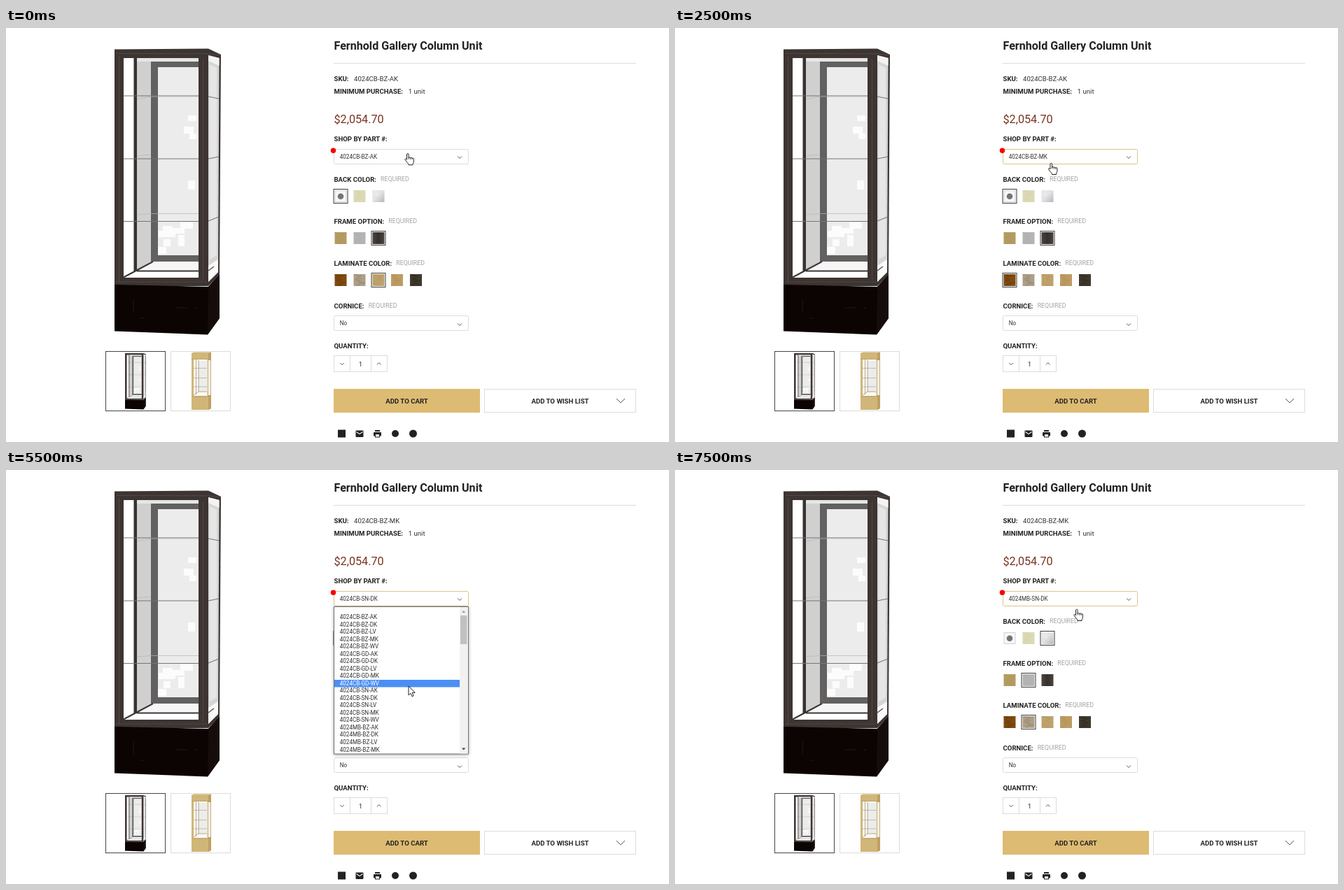
Animation, 947 px wide and 592 px high, one loop 8 s. Source, as an HTML page:

```html
<!DOCTYPE html>
<html lang="en">
<head>
<meta charset="utf-8">
<title>Product options</title>
<style>
html, body { margin: 0; width: 100%; height: 100%; overflow: hidden; background: #fff; }
svg { display: block; width: 947px; height: 592px; }
text { font: 9.6px Roboto, Arial, sans-serif; fill: #333; white-space: pre; }
.title { font-size: 16.1px; font-weight: 700; fill: #222; }
.price { font-size: 16.2px; fill: #7b3320; }
.label { font-weight: 700; fill: #222; }
.req { font-size: 8.8px; fill: #a3a3a3; }
.opt { font-size: 8.13px; }
.mid { text-anchor: middle; }
.box { fill: #fff; stroke: #dcdcdc; }
.chev { fill: none; stroke: #555; stroke-width: 1; }
#list { filter: drop-shadow(0 1.5px 2px rgba(0,0,0,.35)); }
</style>
</head>
<body>
<svg viewBox="0 0 947 592">
  <defs>
    <linearGradient id="mirror" x2="1" y2="1">
      <stop offset="0" stop-color="#d9dadc"/><stop offset=".45" stop-color="#e3e4e6"/><stop offset="1" stop-color="#b5b6b9"/>
    </linearGradient>
    <linearGradient id="bronze" x2="1">
      <stop offset="0" stop-color="#4a433c"/><stop offset=".5" stop-color="#35302c"/><stop offset="1" stop-color="#4b423c"/>
    </linearGradient>
    <clipPath id="rows"><rect x="469" y="196" width="179" height="209"/></clipPath>
  </defs>
  <g id="page"></g>
  <g id="choice"></g>
  <g id="list"></g>
  <g id="pointer"></g>
</svg>
<script>
const $ = id => document.getElementById(id);
const rect = (x, y, w, h, fill, extra = '') =>
  `<rect x="${x}" y="${y}" width="${w}" height="${h}" fill="${fill}" ${extra}/>`;
const text = (x, y, s, cls = '') => `<text x="${x}" y="${y}" class="${cls}">${s}</text>`;
const path = (d, fill, extra = '') => `<path d="${d}" fill="${fill}" ${extra}/>`;
const line = (d, color, w = 1) => path(d, 'none', `stroke="${color}" stroke-width="${w}"`);
const chevron = (x, y, r, up) =>
  `<path class="chev" d="M${x - r} ${y + (up ? r : -r) / 2}L${x} ${y + (up ? -r : r) / 2}L${x + r} ${y + (up ? r : -r) / 2}"/>`;
const box = (x, y, w, h, r = 0, style = '') =>
  `<rect class="box" x="${x}" y="${y}" width="${w}" height="${h}" rx="${r}" style="${style}"/>`;

function random(seed) {
  return () => (seed = (seed * 16807) % 2147483647) / 2147483647;
}

// Glass cabinet on a dark plinth
function cabinet() {
  const frame = '#3d3532';
  let s = path('M155 30.5L289 29.5 307 38 305 354 289 369H155Z', frame);
  s += path('M168 43H275V357H168Z', '#fff');
  s += path('M187 43H207V334L187 347Z', '#d0d0d0');
  s += path('M207 48H275V334H207Z', '#626160');
  s += path('M217 56H275V325H217Z', '#ececec');
  s += path('M187 43H275V48H187Z', '#e6e6e6');
  s += path('M182.5 43H187V348H182.5Z', '#38322f');
  s += path('M207 334H275V346H187Z', '#f6f6f6');
  s += line('M168 356.5L210 334M187 347.5H275', '#3b3634', 2);
  s += path('M170 357L187 349H275V357Z', '#fff');
  s += path('M289 39L304.5 43 303 349 289 363Z', '#d6d6d6');
  s += path('M289 39L304.5 43V54L289 47Z', '#f3f3f3');
  s += path('M291 52L301 57V325L291 331Z', '#e6e6e6');
  s += path('M289 340L303 331V349L289 363Z', '#fafafa');
  s += line('M289 347L297 341', '#5a5552', 1.5);
  s += line('M158 36.5L288 36.8 306 39M161.5 40V364M281.5 45V360', '#5a504b', .8);
  s += line('M157 363H287', '#544a46', .8);
  // Bright reflections on the back panel
  const flecks = [[260, 125, 12, 8], [254, 141, 14, 10], [262, 151, 10, 8], [260, 218, 10, 13],
    [249, 278, 18, 9], [224, 283, 14, 8], [218, 290, 24, 9], [236, 286, 19, 8],
    [225, 302, 10, 10], [217, 313, 12, 10], [246, 296, 9, 16]];
  for (const f of flecks) s += rect(...f, '#fcfcfc');
  s += line('M168 97H275M289 98L304 101M168 187H275M289 187L304 184M168 276.5H275M289 276L304 270', '#777', 1.1);
  s += line('M187 102L207 98H275M187 183L207 181M187 267L207 265.5H275', '#b5b5b5', .7);
  s += path('M155 367L289 370 305 353V415L288 438.5 155 433.5Z', '#0b0403');
  s += path('M289 370L305 353V415L288 438.5Z', '#160c09');
  s += line('M182 388V406M192 415H197M242 400H259M269 400H273', '#2c1d17', .8);
  return s;
}

function oakThumb() {
  const oak = '#d0b678';
  let s = path('M265 465L268 463.5H293V544L289 546H265Z', oak);
  s += path('M289 465L293 463.5V544L289 546Z', '#bea064');
  s += rect(268, 474, 19.5, 52, '#faf9f6') + rect(289, 475, 3.2, 50, '#f1eee6');
  s += rect(275, 476, 12.5, 44, '#ececeb');
  s += line('M271.5 474V524M268 525L275 520H287M275 475V520', '#a99367', .8);
  s += line('M268 486.5H287M268 500.5H287M268 513H287', '#999', .6);
  s += line('M265 473.5H293M265 527H289L293 525', '#b59a62', .7);
  return s;
}

const COLS = [469.5, 496.5, 523.5, 550, 577];
const ROWS = [232, 292, 352];
let seed = 7;

function swatch(col, row, fill, grain) {
  const x = COLS[col], y = ROWS[row], rnd = random(seed += 31);
  let s = rect(x, y, 17, 17, fill);
  for (let i = 0; grain && i < 9; i++) {
    const gx = x + rnd() * 8, gy = y + 1 + i * 1.8;
    s += line(`M${gx} ${gy}l${4 + rnd() * 5} ${rnd() - .5}`, grain, .7);
  }
  return s;
}

function swatches() {
  const x = COLS[0], y = ROWS[0];
  return rect(x + .5, y + .5, 16, 16, '#f7f7f7', 'stroke="#d2d2d2"')
    + `<circle cx="${x + 8.5}" cy="${y + 8.7}" r="4.3" fill="#747474"/>`
    + swatch(1, 0, '#dcdab5', '#d3d1aa') + swatch(2, 0, 'url(#mirror)')
    + path('M523.5 232H532V240H523.5Z', '#eeeeef', 'opacity=".6"')
    + swatch(0, 1, '#b49c61', '#af965a') + swatch(1, 1, '#b4b4b5', '#afafb0') + swatch(2, 1, 'url(#bronze)')
    + swatch(0, 2, '#7f4b10', '#633608') + swatch(1, 2, '#ae9f87', '#8f806b')
    + swatch(2, 2, '#bfa26d', '#b1935d') + swatch(3, 2, '#bd9c63', '#b18e54')
    + swatch(4, 2, '#40382c', '#2c261d');
}

function icons() {
  const ink = '#222';
  return rect(474, 574.5, 11, 11, ink)
    + rect(499.5, 575.5, 11, 9.5, ink, 'rx="1"') + line('M500.5 577.5L505 580.7 509.5 577.5', '#fff', 1.1)
    + rect(527, 575, 7, 2, ink) + rect(525, 578, 11, 5.5, ink, 'rx="1"')
    + rect(527.5, 580.7, 6, 4.3, '#fff', `stroke="${ink}"`)
    + `<circle cx="556" cy="580" r="5" fill="${ink}"/><circle cx="581.5" cy="580" r="5.5" fill="${ink}"/>`;
}

function page() {
  const labels = [['BACK COLOR:', 220, 535], ['FRAME OPTION:', 280, 546.3],
    ['LAMINATE COLOR:', 340, 557.3], ['CORNICE:', 400.7, 517.7]];
  return `<g id="case">${cabinet()}</g>`
    + box(142.5, 462.5, 85, 85, 0, 'stroke:#444') + box(235.5, 462.5, 85, 85)
    + '<use href="#case" transform="translate(170 465) scale(.197) translate(-155 -30)"/>' + oakThumb()
    + text(468.5, 31, 'Fernhold Gallery Column Unit', 'title')
    + line('M468 50.5H900', '#dcdcdc')
    + text(468.5, 75.5, 'SKU:', 'label')
    + text(468.5, 93.5, 'MINIMUM PURCHASE:', 'label') + text(574.7, 93.5, '1 unit')
    + text(468.5, 135.7, '$2,054.70', 'price')
    + text(468.5, 162.3, 'SHOP BY PART #:', 'label')
    + labels.map(([s, y, x]) => text(468.5, y, s, 'label') + text(x, y - .6, 'REQUIRED', 'req')).join('')
    + swatches()
    + box(468.5, 411.5, 192, 21, 2) + text(476.7, 425, 'No', 'opt') + chevron(648, 424, 3)
    + text(468.5, 457.6, 'QUANTITY:', 'label')
    + box(468.5, 468.5, 76, 23) + line('M491.5 469V491M521.5 469V491', '#dcdcdc')
    + chevron(480, 480.3, 2.7) + chevron(532.7, 480, 2.7, true) + text(506.5, 483.6, '1', 'mid')
    + rect(468, 516, 209, 34, '#debb72') + text(572.5, 536.8, 'ADD TO CART', 'label mid')
    + box(683.5, 516.5, 216, 33) + text(791.5, 536.8, 'ADD TO WISH LIST', 'label mid')
    + chevron(878, 533, 6) + icons();
}

const PARTS = ['CB', 'MB', 'PB'].flatMap(b => ['BZ', 'GD', 'SN'].flatMap(f =>
  ['AK', 'DK', 'LV', 'MK', 'WV'].map(l => `4024${b}-${f}-${l}`)));

function choice(s) {
  let out = text(497, 75.5, s.sku)
    + box(468.5, 173.5, 192, 21, 2, s.focus ? 'stroke:#d8c48c' : '')
    + text(476.7, 186.8, s.part, 'opt') + chevron(648, 185, 3);
  s.picks.forEach((col, row) =>
    out += rect(COLS[col] - 1.5, ROWS[row] - 1.5, 20, 20, 'none', 'stroke="#3a3a3a"'));
  const dots = s.marks
    ? s.picks.map((col, row) => [COLS[col] - 2.5, ROWS[row] - 2.2])
    : [[467.5, 175.3]];
  for (const [x, y] of dots) out += `<circle cx="${x}" cy="${y}" r="3.7" fill="#f80000"/>`;
  return out;
}

function list(s) {
  if (s.hover === undefined) return '';
  const scroll = s.scroll || 0, step = 10.53;
  const rows = PARTS.map((p, i) => {
    const y = 210 + i * step - scroll, on = i === s.hover;
    if (y < 190 || y > 412) return '';
    return (on ? rect(469, Math.round(y - 4.6), 179, 10.5, '#4b8ff5') : '')
      + `<text class="opt" x="476.7" y="${y + 3}"${on ? ' style="fill:#fff"' : ''}>${p}</text>`;
  }).join('');
  return rect(468.5, 195.5, 192, 210.5, '#fff', 'stroke="#727272"')
    + `<g clip-path="url(#rows)">${rows}</g>`
    + rect(648, 196, 12, 209.5, '#f1f1f1')
    + rect(649, 208 + scroll * .19, 9.5, 41, '#c1c1c1')
    + path('M651 204L653.7 201 656.4 204Z', scroll ? '#444' : '#a0a0a0')
    + path('M651 397.5L653.7 400.5 656.4 397.5Z', '#444');
}

const SHAPES = {
  arrow: 'M0 0V13L3 10.3 5 14.8 7.1 13.9 5.2 9.4H9.2Z',
  hand: 'M-1.5 1.2q0-1.4 1.3-1.4t1.3 1.4V6q.2-1 1.3-.9 1.2.1 1.3 1.2.2-.9 1.3-.8 1.1.1 1.2 1.2.2-.7 1.1-.6 1.1.1 1.1 1.5V11q0 2-1.4 3.5V16H1V14.8Q-1.5 12-3.8 8.8q-.6-1.1.2-1.6.9-.4 2.1 1.2Z'
};

function pointer([kind, x, y]) {
  const folds = kind === 'hand' ? line('M1.1 5.5V8M3.7 6V8.3M6.2 6.5V8.6', '#222', .8) : '';
  return `<g transform="translate(${x} ${y})">`
    + path(SHAPES[kind], '#fff', 'stroke="#222" stroke-width="1" stroke-linejoin="round"') + folds + '</g>';
}

// Each step carries over sku, part, picks and focus from the one before
const steps = [
  { at: 0, sku: '4024CB-BZ-AK', part: '4024CB-BZ-AK', picks: [0, 2, 2], cursor: ['hand', 574, 179.8] },
  { at: 500, focus: true, hover: 0, cursor: ['hand', 574, 179.8] },
  { at: 1000, hover: 3, cursor: ['arrow', 524, 240] },
  { at: 1500, part: '4024CB-BZ-MK', picks: [0, 2, 0], marks: true, cursor: ['arrow', 612, 354] },
  { at: 2500, cursor: ['hand', 537.5, 193.5] },
  { at: 3000, hover: 3, cursor: ['hand', 540, 185] },
  { at: 3500, hover: 11, cursor: ['arrow', 548, 323] },
  { at: 4000, part: '4024CB-SN-DK', picks: [0, 1, 1], marks: true, cursor: ['arrow', 564, 324] },
  { at: 5000, cursor: ['hand', 580, 182] },
  { at: 5500, sku: '4024CB-BZ-MK', hover: 9, cursor: ['arrow', 575, 309] },
  { at: 6000, hover: 24, scroll: 147.7, cursor: ['arrow', 570, 312] },
  { at: 6500, part: '4024MB-SN-DK', picks: [2, 1, 1], marks: true, cursor: ['arrow', 583, 383] },
  { at: 7500, cursor: ['hand', 574, 199.5] }
];
steps.forEach((s, i) => {
  if (!i) return;
  const { sku, part, picks, focus } = steps[i - 1];
  steps[i] = { sku, part, picks, focus, ...s };
});

const LOOP = 8000;
let shown;

function draw(now) {
  const t = now % LOOP;
  const s = steps.findLast(step => step.at <= t) || steps[0];
  if (s !== shown) {
    $('choice').innerHTML = choice(s);
    $('list').innerHTML = list(s);
    $('pointer').innerHTML = pointer(s.cursor);
    shown = s;
  }
}

$('page').innerHTML = page();
const start = performance.now();
function tick() {
  draw(performance.now() - start);
  requestAnimationFrame(tick);
}
tick();
</script>
</body>
</html>
```
